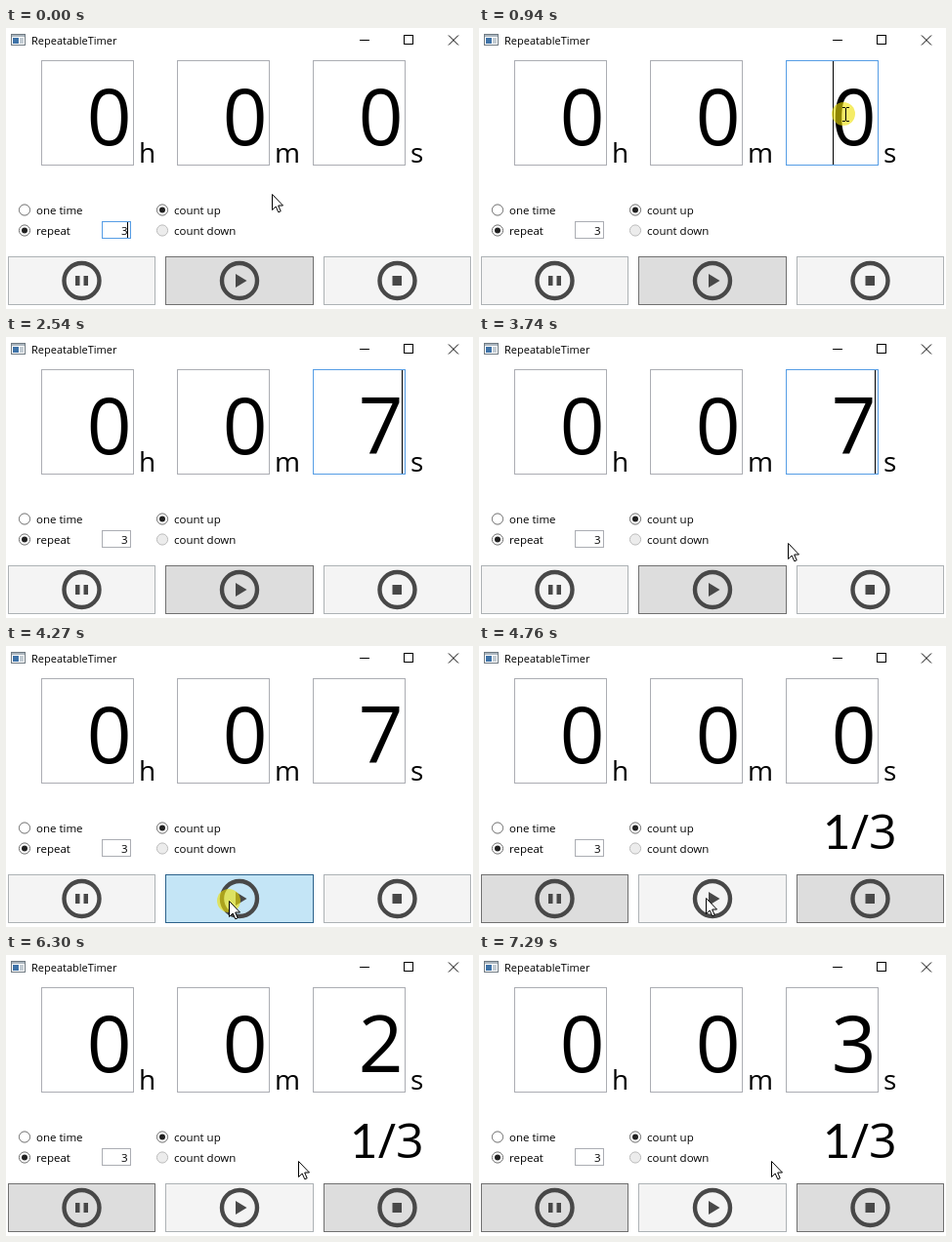
These frames come from a looping animation (478 px wide and 288 px high, 8 s). An HTML page:

```html
<!DOCTYPE html>
<html lang="en">
<head>
<meta charset="utf-8">
<title>RepeatableTimer</title>
<style>
  html, body { margin: 0; width: 100%; height: 100%; overflow: hidden; background: #fff; }
  svg { display: block; width: 478px; height: 288px; }
  text { font-family: "Open Sans", "Noto Sans", sans-serif; font-size: 11.5px; fill: #000; }
  .title { font-size: 11px; }
  .digit { font-size: 80px; text-anchor: middle; }
  .unit { font-size: 28px; }
  .count { font-size: 50px; }
  .one { font-family: Lato, sans-serif; }
  .digit.one { font-size: 78.5px; }
  .count.one { font-size: 49px; }
  .line { fill: none; stroke: #000; }
  .crisp { shape-rendering: crispEdges; }
</style>
</head>
<body>
<svg id="stage" viewBox="0 0 478 288" xmlns="http://www.w3.org/2000/svg"></svg>
<script>
const LOOP = 8000;
const PRESS_BOX = 880, DRAG = 955, RELEASE_BOX = 1280, TYPE = 2540;
const PRESS_PLAY = 4200, START = 4330;
const GREY = "#abadb3", HOVER = "#7eb4ea", FOCUS = "#569de5", ICON = "#484848";

const stage = document.getElementById("stage");

function add(tag, attrs, parent = stage) {
  const el = document.createElementNS("http://www.w3.org/2000/svg", tag);
  set(el, attrs);
  parent.appendChild(el);
  return el;
}

function set(el, attrs) {
  for (const key in attrs) el.setAttribute(key, attrs[key]);
}

function show(el, on) {
  el.setAttribute("visibility", on ? "visible" : "hidden");
}

function rect(x, y, width, height, fill, stroke = "none", parent = stage) {
  return add("rect", { x, y, width, height, fill, stroke }, parent);
}

function label(x, y, text, cls = "", parent = stage) {
  const el = add("text", { x, y, class: cls }, parent);
  el.textContent = text;
  return el;
}

function path(d, attrs, parent = stage) {
  return add("path", { d, ...attrs }, parent);
}

// Title bar
rect(5.5, 6.5, 14, 11, "#fff", "#707a82");
rect(6, 7, 13, 2, "#a9b4bd");
rect(7, 10, 6, 6, "#3f73a8");
rect(14, 10, 4, 6, "#c3ccd3");
label(26, 17, "RepeatableTimer", "title");
path("M362 12.5h10M407.5 7.5h9v9h-9z", { class: "line crisp" });
path("M453 7.5l10 10M463 7.5l-10 10", { class: "line" });

// Time boxes
const boxes = ["h", "m", "s"].map((unit, i) => {
  const x = 36 + 139 * i;
  const frame = rect(x + .5, 33.5, 94, 107, "#fff", GREY);
  const digit = label(x + 69.5, 120, "0", "digit");
  label(x + 100, 138, unit, "unit");
  return { frame, digit };
});
const seconds = boxes[2];
const selection = rect(363, 34, 42, 106, "#0078d7");
set(selection, { "fill-opacity": .4 });
const caret = rect(362, 34, 1, 106, "#000");

// Options
function radio(x, y, text, checked, enabled = true) {
  add("circle", {
    cx: x, cy: y, r: 5.6,
    fill: enabled ? "#fff" : "#ececec", stroke: enabled ? "#707070" : "#bcbcbc"
  });
  if (checked) add("circle", { cx: x, cy: y, r: 3, fill: "#212121" });
  label(x + 12, y + 4.5, text);
}
radio(19, 186.5, "one time", false);
radio(19, 207.5, "repeat", true);
radio(160, 186.5, "count up", true);
radio(160, 207.5, "count down", false, false);
const repeatBox = rect(98.5, 198.5, 29, 17, "#fff", GREY);
label(118, 212, "3");
const repeatCaret = rect(124, 199, 1, 16, "#000");

// Round counter
const rounds = add("g", {});
label(352, 208, "1", "count one", rounds);
set(label(427.6, 208, "/3", "count", rounds), { "text-anchor": "end" });

// Buttons
const STYLES = {
  off: { fill: "#f4f4f4", stroke: "#adb2b5" },
  on: { fill: "#dddddd", stroke: "#707070" },
  hover: { fill: "#bee6fd", stroke: "#3c7fb1" },
  pressed: { fill: "#c4e5f6", stroke: "#2c628b" }
};
function button(x, width, cx, icon) {
  const el = rect(x + .5, 234.5, width, 49, "#ddd", "#707070");
  add("circle", { cx, cy: 259, r: 18, fill: "none", stroke: ICON, "stroke-width": 4.4 });
  path(icon, { fill: ICON, transform: `translate(${cx} 259)` });
  return el;
}
const pause = button(2, 150, 77.5, "M-6.5 -5h4.5v10h-4.5zM2 -5h4.5v10h-4.5z");
const play = button(163, 151, 239, "M-4 -7L7.5 0L-4 7z");
const stop = button(325, 150, 400.5, "M-5 -5h9.5v10h-9.5z");

// Pointer
const pointer = add("g", {});
const halo = add("circle", { r: 12, fill: "#eee000", "fill-opacity": .6 }, pointer);
const arrow = path("M.5 .5V16.5L4.2 13L6.8 18.8L9.2 17.8L6.7 12H11.5Z",
  { fill: "#fff", stroke: "#000" }, pointer);
const beam = path("M-1 -6.5h3M3 -6.5h3M2.5 -6V7M-1 7.5h3M3 7.5h3",
  { class: "line crisp" }, pointer);

const linear = p => p;
const easeIn = p => p * p;
const easeOut = p => p * (2 - p);
const smooth = p => p * p * (3 - 2 * p);

// [time, x, y, easing towards this point]
const ROUTE = [
  [0, 272, 170, linear],
  [300, 272, 170, linear],
  [730, 373, 88, smooth],
  [DRAG, 373, 88, linear],
  [1255, 402, 88, smooth],
  [3360, 402, 88, linear],
  [3740, 316, 211, easeIn],
  [4120, 228, 261, easeOut],
  [4710, 228, 261, linear],
  [4790, 234, 257, linear],
  [5230, 234, 257, linear],
  [5510, 254, 244, easeIn],
  [5890, 299, 211, easeOut],
  [LOOP, 299, 211, linear]
];

function pointerAt(t) {
  const i = ROUTE.findIndex(stop => t < stop[0]);
  const [t0, x0, y0] = ROUTE[i - 1];
  const [t1, x1, y1, ease] = ROUTE[i];
  const p = ease((t - t0) / (t1 - t0));
  return [Math.round(x0 + (x1 - x0) * p), Math.round(y0 + (y1 - y0) * p)];
}

const within = (t, from, to) => t >= from && t < to;

function secondsAt(t) {
  if (t < TYPE) return 0;
  if (t < START) return 7;
  return [5310, 6300, 7290].filter(tick => t >= tick).length;
}

function render(t) {
  const [x, y] = pointerAt(t);
  const overBox = x >= 314 && x < 409 && y >= 33 && y < 141;
  const overPlay = x >= 163 && x < 315 && y >= 234 && y < 284;
  const focused = within(t, PRESS_BOX, PRESS_PLAY);
  const running = t >= START;

  set(pointer, { transform: `translate(${x} ${y})` });
  show(pointer, !within(t, TYPE, 3380));
  show(arrow, !overBox && !within(t, TYPE, 3380));
  show(beam, overBox && !within(t, TYPE, 3380));
  show(halo, within(t, PRESS_BOX, RELEASE_BOX) || within(t, PRESS_PLAY, START));

  const value = secondsAt(t);
  seconds.digit.textContent = value;
  set(seconds.digit, { class: value === 1 ? "digit one" : "digit" });
  set(seconds.frame, { stroke: focused ? FOCUS : overBox ? HOVER : GREY });
  const selected = x > 383 && within(t, DRAG, TYPE);
  show(selection, selected);
  set(caret, { x: t < TYPE ? 362 : 405 });
  show(caret, focused && !selected && !within(t, 3180, 3710));

  set(repeatBox, { stroke: t < PRESS_BOX ? FOCUS : GREY });
  show(repeatCaret, t < 60 || within(t, 590, PRESS_BOX));

  show(rounds, running);
  set(pause, STYLES[running ? "on" : "off"]);
  set(stop, STYLES[running ? "on" : "off"]);
  set(play, STYLES[running ? "off" : t >= PRESS_PLAY ? "pressed" : overPlay ? "hover" : "on"]);
}

const begin = performance.now();
function tick() {
  render((performance.now() - begin) % LOOP);
  requestAnimationFrame(tick);
}
render(0);
requestAnimationFrame(tick);
</script>
</body>
</html>
```
